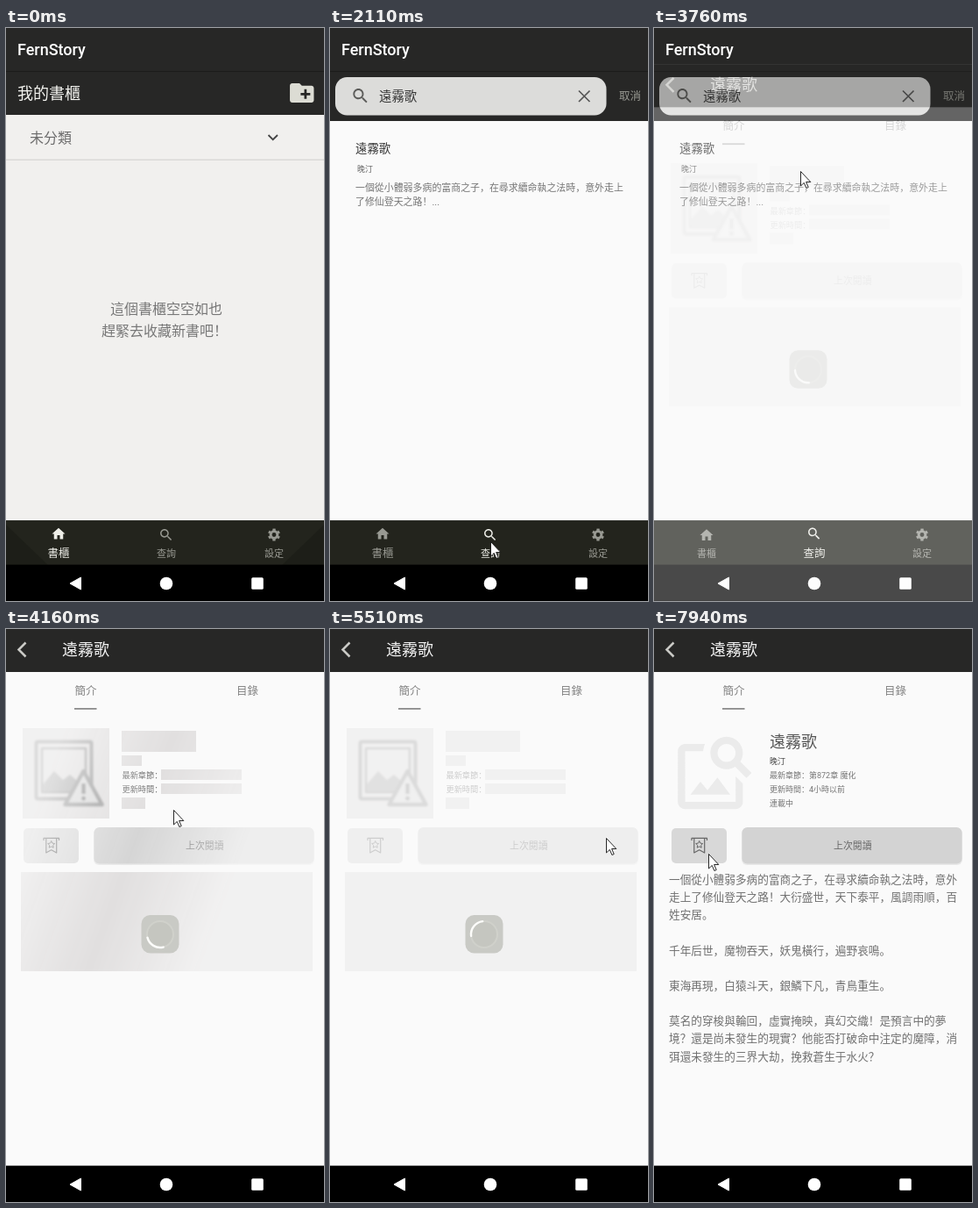
An HTML page for the animation above (8 s loop, 363 by 653 pixels).

```html
<!DOCTYPE html>
<html lang="zh-Hans">
<head>
<meta charset="utf-8">
<title>Novel reader</title>
<style>
  html, body { margin: 0; width: 100%; height: 100%; overflow: hidden; background: #000; }
  svg { display: block; width: 100%; height: 100%; }
  text { font-family: Roboto, 'Noto Sans CJK SC', 'Noto Sans CJK', sans-serif; white-space: pre; }
</style>
</head>
<body>
<svg id="stage" viewBox="0 0 363 653" xmlns="http://www.w3.org/2000/svg"></svg>
<script>
const LOOP = 8000;
const APP = 'FernStory', BOOK = '遠霧歌', AUTHOR = '晚汀';
const DARK = '#272726', PAPER = '#fafafa', GREY = '#989992', LIT = '#eeeee8';

const ICON = {
  home: 'M10 20v-6h4v6h5v-8h3L12 3 2 12h3v8z',
  search: 'M15.5 14h-.79l-.28-.27C15.41 12.59 16 11.11 16 9.5 16 5.91 13.09 3 9.5 3S3 5.91 3 9.5 5.91 16 9.5 16c1.61 0 3.09-.59 4.23-1.57l.27.28v.79l5 4.99L20.49 19l-4.99-5zm-6 0C7.01 14 5 11.99 5 9.5S7.01 5 9.5 5 14 7.01 14 9.5 11.99 14 9.5 14z',
  folder: 'M20 6h-8l-2-2H4c-1.11 0-1.99.89-1.99 2L2 18c0 1.11.89 2 2 2h16c1.11 0 2-.89 2-2V8c0-1.11-.89-2-2-2zm-1 8h-3v3h-2v-3h-3v-2h3V9h2v3h3v2z',
  cover: 'M18 13v7H4V6h5.02c.05-.71.22-1.38.48-2H4c-1.1 0-2 .9-2 2v14c0 1.1.9 2 2 2h14c1.1 0 2-.9 2-2v-5l-2-2zm-1.5 5h-11l2.75-3.53 1.96 2.36 2.75-3.54zm2.8-9.11c.44-.7.7-1.51.7-2.39C20 4.01 17.99 2 15.5 2S11 4.01 11 6.5s2.01 4.5 4.49 4.5c.88 0 1.7-.26 2.39-.7L21 13.42 22.42 12 19.3 8.89zM15.5 9C14.12 9 13 7.88 13 6.5S14.12 4 15.5 4 18 5.12 18 6.5 16.88 9 15.5 9z'
};

// Markup helpers; text is placed by its vertical centre.
const rect = (x, y, w, h, fill, r = 0, more = '') =>
  `<rect x="${x}" y="${y}" width="${w}" height="${h}" rx="${r}" fill="${fill}" ${more}/>`;
const text = (x, cy, size, fill, str, more = '') =>
  `<text x="${x}" y="${cy + size * 0.37}" font-size="${size}" fill="${fill}" ${more}>${str}</text>`;
const line = (d, stroke, width, more = '') =>
  `<path d="${d}" fill="none" stroke="${stroke}" stroke-width="${width}" ${more}/>`;
const icon = (name, x, y, scale, fill) =>
  `<path d="${ICON[name]}" transform="translate(${x} ${y}) scale(${scale})" fill="${fill}"/>`;
const group = (id, body, more = '') => `<g id="${id}" ${more}>${body}</g>`;

const systemBar = rect(0, 611.6, 363, 42, '#000') +
  '<path d="M73 633L85.500 626V640Z" fill="#fff" stroke="#fff" stroke-linejoin="round"/>' +
  '<circle cx="183" cy="633" r="7.300" fill="#fff"/>' + rect(280.2, 626.2, 13.6, 13.6, '#fff', 1.5);

const gear =
  '<g fill="none" stroke="currentColor" transform="translate(306 577.500)">' +
  '<circle r="3.900" stroke-width="3"/>' +
  '<circle r="5.900" stroke-width="2.400" pathLength="12" stroke-dasharray="1 1" stroke-dashoffset=".5" transform="rotate(30)"/></g>';

const tab = (id, cx, label, glyph) =>
  group(id, `<g class="glyph">${glyph}</g>` +
    text(cx, 598.5, 11, 'currentColor', label, 'text-anchor="middle"'));

const bottomNav = rect(0, 561.3, 363, 51, '#23241d') +
  group('corners', '<path d="M0 566L48 612H0ZM363 566L315 612H363Z" fill="#1a1b15" opacity=".6"/>') +
  tab('tabShelf', 60, '書櫃', icon('home', 51, 568.9, 0.75, 'currentColor')) +
  tab('tabSearch', 183, '查詢', icon('search', 173.8, 568.7, 0.75, 'currentColor')) +
  `<g color="${GREY}">${gear}${text(306, 598.5, 11, GREY, '設定', 'text-anchor="middle"')}</g>`;

const appBar = rect(0, 0, 363, 49, DARK) + rect(0, 49, 363, 1.5, '#1c1c1b') +
  text(13, 24, 18, '#fff', APP, 'font-weight="500"');

const shelf = rect(0, 50, 363, 511.3, '#f1f0ee') + rect(0, 50, 363, 49, DARK) +
  text(13, 74, 18, '#f4f4f0', '我的書櫃') + icon('folder', 321.3, 57.5, 1.37, '#dcdcd4') +
  text(27, 125, 16, '#6c6c6c', '未分類') + line('M299.500 122L304.700 127.200L310 122', '#444', 1.8) +
  rect(0, 149.5, 363, 1.5, '#dadad8') +
  text(119, 320, 16, '#777', '這個書櫃空空如也') + text(109, 345.5, 16, '#777', '趕緊去收藏新書吧！');

const results = rect(0, 50, 363, 511.3, PAPER) + rect(0, 50, 363, 56, DARK) +
  rect(6, 56, 309.5, 43.4, '#dcdcda', 13.5) + icon('search', 23.6, 66.3, 0.93, '#5c5c5a') +
  text(56, 78, 14.4, '#333', BOOK) +
  line('M284 71.500L296.500 84M296.500 71.500L284 84', '#555', 1.7) +
  text(330, 77.5, 12.5, GREY, '取消') +
  text(29, 137, 13.4, '#333', BOOK) + text(31, 160.5, 9, '#666', AUTHOR) +
  text(29, 182, 10.93, '#757575', '一個從小體弱多病的富商之子，在尋求續命執之法時，意外走上') +
  text(29, 198, 10.93, '#757575', '了修仙登天之路！...');

const buttons = rect(20, 227, 63, 40, '#d8d8d8', 5) +
  rect(100, 227, 252, 42, '#000', 6, 'opacity=".07"') +
  rect(100.5, 226, 251, 41.5, '#d3d3d3', 6) +
  text(205, 247, 10.9, '#666', '上次閱讀') +
  '<g stroke-linejoin="round">' +
  line('M43 241V238.300H60.500V241M45.800 238.300V255L51.700 251.800L57.700 255V238.300', '#666', 1.2) +
  line('M51.700 241.500L52.900 244.100L55.700 244.500L53.700 246.400L54.200 249.200L51.700 247.900L49.200 249.200L49.700 246.400L47.700 244.500L50.500 244.100Z', '#666', 1) +
  '</g>';

const brokenImage = '<g filter="url(#soft)">' +
  '<g fill="none" stroke="#949494" stroke-linejoin="round">' +
  '<rect x="34.500" y="128.500" width="63" height="65" rx="2" stroke-width="4"/>' +
  '<rect x="41" y="136" width="50" height="50" stroke-width="2.500"/></g>' +
  '<path d="M42 177L55 162L65 172L73 166L80 172V185H42Z" fill="#a8a8a8"/>' +
  '<path d="M88.500 162L109.500 200H67.500Z" fill="#d9d9d9" stroke="#949494" stroke-width="4.500" stroke-linejoin="round"/>' +
  '<path d="M88.500 176V188" stroke="#858585" stroke-width="4.500"/><circle cx="88.500" cy="193" r="2.500" fill="#858585"/></g>';

const blocks = [[19, 113, 99, 103], [132, 116, 85, 24], [132, 144, 23, 12], [177, 160, 92, 12],
  [177, 176, 92, 12], [132, 192, 27, 13], [17, 277, 333, 113]];
const skeleton = blocks.map(b => rect(...b, '#dfdddd')).join('') + brokenImage + buttons +
  text(132.5, 167, 9.2, '#666', '最新章節：') + text(132.5, 183, 9.2, '#666', '更新時間：');

const spinner = rect(154.5, 326, 43, 43.5, '#c9cac5', 10) +
  '<circle cx="176" cy="348" r="15" fill="#c5c6c0" stroke="#d0d1cb" stroke-width="2"/>' +
  '<path id="arc" d="M191 348A15 15 0 0 1 176 363" fill="none" stroke-width="2.400" stroke-linecap="round"/>';

const story = [
  '一個從小體弱多病的富商之子，在尋求續命執之法時，意外',
  '走上了修仙登天之路！大衍盛世，天下泰平，風調雨順，百',
  '姓安居。', '',
  '千年后世，魔物吞天，妖鬼橫行，遍野哀鳴。', '',
  '東海再現，白猿斗天，銀鱗下凡，青鳥重生。', '',
  '莫名的穿梭與輪回，虛實掩映，真幻交織！是預言中的夢',
  '境？還是尚未發生的現實？他能否打破命中注定的魔障，消',
  '弭還未發生的三界大劫，挽救蒼生于水火？'
];
const loaded = icon('cover', 19, 114.5, 4.12, '#ebebeb') + buttons +
  text(132, 128.5, 18, '#555', BOOK) + text(132, 151, 9, '#444', AUTHOR) +
  text(132, 167, 9, '#757575', '最新章節：第872章 魔化') +
  text(132, 183, 9, '#757575', '更新時間：4小時以前') + text(132, 199, 9, '#757575', '連載中') +
  story.map((s, i) => text(17, 285.5 + i * 20.14, 12.66, '#707070', s)).join('');

const detail = rect(0, 0, 363, 653, PAPER) + rect(0, 0, 363, 49, DARK) +
  line('M22.500 15.500L14.500 23.500L22.500 31.500', '#cacac6', 2.5) +
  text(64, 23.5, 18, '#f4f4f4', BOOK) +
  text(78.5, 70.5, 12.5, '#828282', '簡介') + text(263, 70.5, 12.5, '#828282', '目錄') +
  rect(78, 90, 25.5, 1.8, '#8c8c8c') +
  group('waiting', group('bones', skeleton, 'mask="url(#sweep)"') + spinner) +
  group('loaded', loaded) + systemBar;

const stop = (at, alpha) => `<stop offset="${at}" stop-color="#fff" stop-opacity="${alpha}"/>`;
const defs = '<defs><filter id="soft"><feGaussianBlur stdDeviation=".9"/></filter>' +
  `<linearGradient id="band" gradientUnits="userSpaceOnUse">${stop(0, 0.3)}${stop(0.5, 0.95)}${stop(1, 0.3)}</linearGradient>` +
  `<mask id="sweep" maskUnits="userSpaceOnUse" x="0" y="0" width="363" height="653">${rect(0, 0, 363, 653, 'url(#band)')}</mask></defs>`;

document.getElementById('stage').innerHTML = defs + appBar +
  group('shelf', shelf) + group('results', results) + bottomNav + systemBar +
  group('detail', detail) +
  '<circle id="tap" r="11.500" fill="#808080" fill-opacity=".35" stroke="#777" stroke-opacity=".4"/>' +
  '<path id="cursor" d="M.5 .5V17L4.300 13.400L6.900 19.500L9.200 18.500L6.600 12.500H11.800Z" fill="#fff" stroke="#111" stroke-width=".9"/>';

const $ = id => document.getElementById(id);
const clamp = (v, lo = 0, hi = 1) => Math.min(hi, Math.max(lo, v));
const show = (id, on) => $(id).setAttribute('display', on ? 'inline' : 'none');
const set = (id, attrs) => { for (const k in attrs) $(id).setAttribute(k, attrs[k]); };

// Pointer stops: time, x, y
const route = [
  [570, 30, 630], [700, 27, 560], [880, 110, 380], [950, 170, 367], [1080, 288, 440],
  [1200, 270, 540], [1350, 183, 585], [2190, 183, 585], [2630, 173, 178], [2690, 173, 178],
  [2770, 167, 163], [3820, 167, 163], [4160, 191, 206], [4220, 191, 206], [4530, 245, 226],
  [5000, 315, 238], [5700, 315, 238], [5900, 315, 243], [7130, 315, 243], [7390, 67, 258],
  [7880, 67, 258], [7940, 62, 256]
];
function pointer(t) {
  const i = route.findIndex(k => k[0] > t);
  if (i < 0) return route[route.length - 1].slice(1);
  if (i === 0) return route[0].slice(1);
  const a = route[i - 1], b = route[i], p = (t - a[0]) / (b[0] - a[0]);
  return [a[1] + (b[1] - a[1]) * p, a[2] + (b[2] - a[2]) * p];
}

function styleTab(id, active, size) {
  const el = $(id);
  el.setAttribute('color', active ? LIT : GREY);
  el.querySelector('.glyph').setAttribute('transform', `translate(0 ${-1.4 * size})`);
  el.querySelector('text').setAttribute('font-size', 11 + 1.5 * size);
}

const TILT = Math.PI / 9, REACH = 120, PASSES = [4160, 4950, 6930];
function shimmer(t) {
  const start = PASSES.find(s => t < s + 560) ?? 6930;
  const c = 145 + (t - start) * 0.726;
  const dx = Math.cos(TILT) * REACH, dy = Math.sin(TILT) * REACH;
  set('band', { x1: c - dx, x2: c + dx, y1: 247 - dy, y2: 247 + dy });
}

function draw(t) {
  const searching = t >= 2040;
  show('shelf', !searching);
  show('corners', !searching);
  show('results', searching);
  const grow = clamp((t - 2180) / 120);
  styleTab('tabShelf', !searching, 1 - grow);
  styleTab('tabSearch', searching, grow);

  show('detail', t >= 3760);
  const p = clamp(0.1 + (t - 3820) / 250, 0.1, 1);
  set('detail', { transform: `translate(0 ${51 * (1 - p) ** 2})`, opacity: clamp(2.9 * p) });
  show('waiting', t < 7130);
  show('loaded', t >= 7130);
  shimmer(t);
  set('arc', {
    transform: `rotate(${75 + (t - 4160) * 0.872} 176 348)`,
    stroke: t < 6200 ? '#fcfcfa' : '#a3a49f'
  });

  const [x, y] = pointer(t);
  show('cursor', t >= 570);
  set('cursor', { transform: `translate(${x} ${y})` });
  show('tap', (t >= 1860 && t < 1970) || (t >= 3020 && t < 3130));
  set('tap', { cx: x, cy: y });
}

const born = performance.now();
function tick() {
  draw((performance.now() - born) % LOOP);
  requestAnimationFrame(tick);
}
tick();
</script>
</body>
</html>
```
